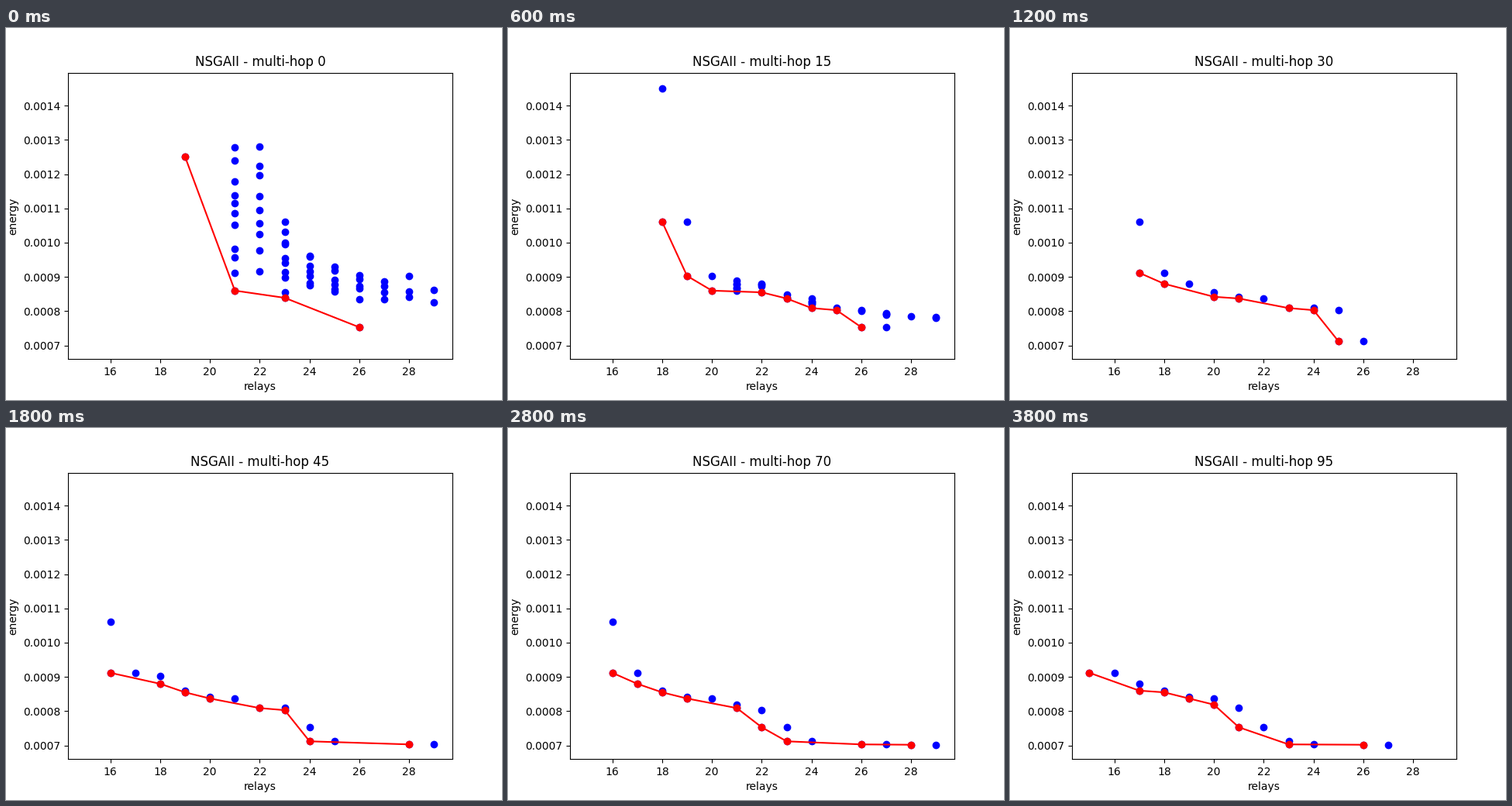
Animation of 640 by 480 pixels, one loop 4 s. Source, as a matplotlib script:

```python
import math
import random

import matplotlib.pyplot as plt
from matplotlib.animation import FuncAnimation

STEP = 5
FRAMES = 20
LAST = STEP * (FRAMES - 1)
BEND = 1.8      # ease-out power of the relay savings
LAYERS = 2      # nondominated layers that survive selection

# Network designs: energy in 1e-6, first generation, relays then, relays at the end.
DESIGNS = [
    (1450, 5, 18, 18),
    (1251, 0, 19, 19),
    (1061, 15, 17.7, 15.52),
    (912, 20, 17, 15.49),
    (903, 15, 19.3, 17.7),
    (880, 20, 18.6, 16.9),
    (860, 0, 21.49, 17.49),
    (855, 0, 23.25, 17.55),
    (842, 25, 20.3, 19.3),
    (839, 0, 23, 23),
    (837, 5, 23.6, 18.7),
    (819, 65, 21.4, 20),
    (809, 15, 24.2, 21),
    (803, 15, 25.2, 21.6),
    (753, 0, 26.4, 25.45),
    (753, 35, 24.95, 21.45),
    (712, 30, 25.2, 22.6),
    (703, 45, 28.2, 25.7),
    (703, 85, 23.4, 23.2),
    (702, 65, 28.2, 26.3),
]


def designs(gen):
    """Living designs, each with a variant that needs one more relay."""
    points = set()
    for energy, born, first, last in DESIGNS:
        if gen < born:
            continue
        left = (LAST - gen) / (LAST - born)
        relays = round(last + (first - last) * left ** BEND)
        points.add((relays, energy))
        if gen > 0:
            points.add((relays + 1, energy))
    return points


def cloud(gen):
    """Random first population, thinning out and sinking."""
    rng = random.Random(4)
    fade = 1 - gen / 20
    points = []
    for relays in range(21, 30):
        d = max(relays - 22, 0)
        low = 805 + 98 * math.exp(-0.3 * d)
        high = 900 + 385 * math.exp(-0.8 * d)
        count = 31 - relays
        for k in range(count):
            height = (k + rng.random()) / count
            if rng.random() < fade:
                energy = low + (high - low) * height * fade ** 2
                points.append((relays, energy - 50 * (1 - fade)))
    return points


def pareto(points):
    front = []
    for relays, energy in sorted(points):
        if not front or energy < front[-1][1]:
            front.append((relays, energy))
    return front


def population(gen):
    rest, kept = designs(gen), []
    for _ in range(LAYERS):
        layer = pareto(rest)
        kept += layer
        rest -= set(layer)
    return kept + cloud(gen)


def scaled(points):
    return [(relays, energy * 1e-6) for relays, energy in points]


fig, ax = plt.subplots(figsize=(6.4, 4.8), dpi=100)
ax.set_xlim(14.3015, 29.734)
ax.set_ylim(0.00066014, 0.00149634)
ax.set_xlabel("relays")
ax.set_ylabel("energy")
title = ax.set_title("")
dots = ax.scatter([], [], color="blue")
line, = ax.plot([], [], color="red")
best = ax.scatter([], [], color="red", zorder=3)


def draw(i):
    gen = i * STEP
    points = population(gen)
    front = scaled(pareto(points))
    dots.set_offsets(scaled(points))
    best.set_offsets(front)
    line.set_data(*zip(*front))
    title.set_text(f"NSGAII - multi-hop {gen}")
    return dots, line, best, title


anim = FuncAnimation(fig, draw, frames=FRAMES, interval=200, repeat=True,
                     repeat_delay=0)
plt.show()
```
